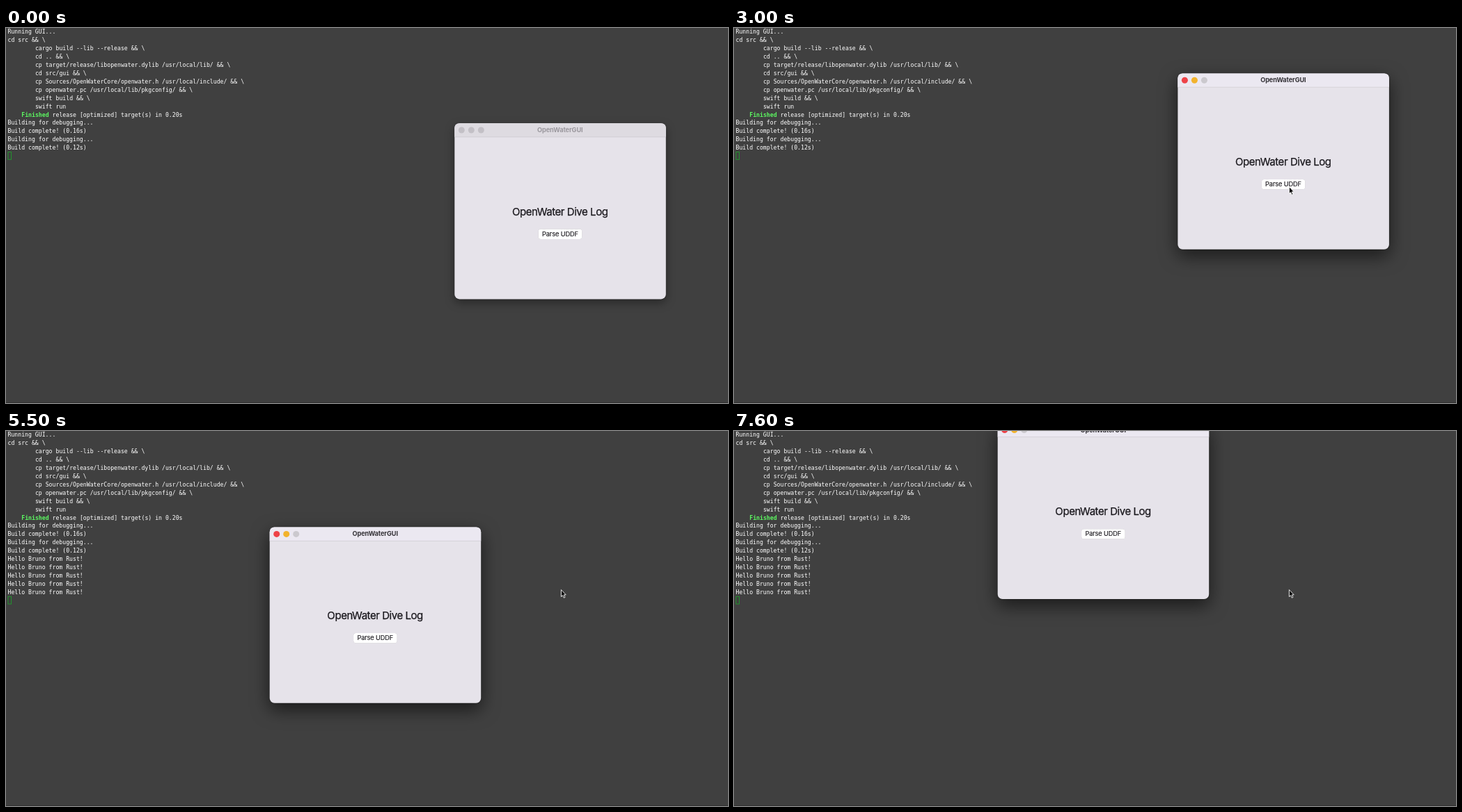
Write an HTML page that moves like this. It is 1037x540 px and loops after 8000 ms.

```html
<!DOCTYPE html>
<html lang="en">
<head>
<meta charset="utf-8">
<title>OpenWaterGUI</title>
<style>
  html, body { margin: 0; width: 100%; height: 100%; overflow: hidden; background: #404040; }
  svg { display: block; width: 1037px; height: 540px; }
  #terminal text { font: 8.19px "DejaVu Sans Mono", monospace; fill: #fff; }
  #terminal .done { font-weight: bold; fill: #5cf761; }
  #caret { fill: none; stroke: #1f9c2c; stroke-width: .9; }
  #window text { font-family: Inter, sans-serif; text-anchor: middle; fill: #1a181d; }
  #window .title { font-size: 9.2px; font-weight: 700; letter-spacing: -.1px; fill: #343237; }
  #window .heading { font-size: 15px; letter-spacing: -.45px; stroke: #1a181d; stroke-width: .25; }
  #window .label { font-size: 9.2px; letter-spacing: -.1px; stroke: #1a181d; stroke-width: .15; }
  .frame { fill: #e6e3ea; filter: drop-shadow(0 9px 13px rgba(0,0,0,.5)) drop-shadow(0 0 1px rgba(0,0,0,.3)); }
  .bar { fill: #ebe8f1; }
  .rule { fill: #d2cfd6; }
  .close { fill: #ee4248; }
  .minimize { fill: #f2b32d; }
  .zoom { fill: #cbc9ce; }
  .button { fill: #fff; filter: drop-shadow(0 .5px .6px rgba(0,0,0,.3)); }
  .pressed .button { fill: #efedf1; }
  .inactive .frame { filter: drop-shadow(0 5px 7px rgba(0,0,0,.32)) drop-shadow(0 0 1px rgba(0,0,0,.25)); }
  .inactive .bar { fill: #dedbe1; }
  .inactive .rule { fill: #cbc8ce; }
  .inactive circle { fill: #c3c0c6; }
  #window.inactive .title { fill: #9b989e; }
  #pointer { fill: #000; stroke: #fff; stroke-width: .9; stroke-linejoin: round; }
</style>
</head>
<body>
<svg viewBox="0 0 1037 540">
  <rect width="1037" height="540" fill="#404040"/>
  <rect y="539" width="1037" height="1" fill="#303030"/>
  <g id="terminal"></g>
  <rect id="caret" x="3" width="4.5" height="10.8"/>
  <g id="window">
    <rect class="frame" width="303.5" height="253.2" rx="7"/>
    <path class="bar" d="M0 19.5V7Q0 0 7 0H296.5Q303.5 0 303.5 7V19.5Z"/>
    <rect class="rule" y="19.3" width="303.5" height=".8"/>
    <circle class="close" cx="10" cy="9.8" r="4.5"/>
    <circle class="minimize" cx="24" cy="9.8" r="4.5"/>
    <circle class="zoom" cx="38" cy="9.8" r="4.5"/>
    <text class="title" x="151.5" y="12.9">OpenWaterGUI</text>
    <text class="heading" x="151.4" y="132.4">OpenWater Dive Log</text>
    <rect class="button" x="120.4" y="152.4" width="62.6" height="14.4" rx="3.6"/>
    <text class="label" x="151.6" y="162.7">Parse UDDF</text>
  </g>
  <path id="pointer" transform="translate(797.4 228.6)"
        d="M0 0V10L2.2 8L3.8 11.6L5.5 10.9L3.9 7.3H6.8Z"/>
</svg>
<script>
const LOOP = 8000, LINE = 11.95, CHAR = 4.93, LEFT = 2.5, BASELINE = 8;
const byId = id => document.getElementById(id);
const terminal = byId('terminal'), caret = byId('caret');
const appWindow = byId('window'), pointer = byId('pointer');

const output = [
  [0, 'Running GUI...'],
  [0, 'cd src && \\'],
  [8, 'cargo build --lib --release && \\'],
  [8, 'cd .. && \\'],
  [8, 'cp target/release/libopenwater.dylib /usr/local/lib/ && \\'],
  [8, 'cd src/gui && \\'],
  [8, 'cp Sources/OpenWaterCore/openwater.h /usr/local/include/ && \\'],
  [8, 'cp openwater.pc /usr/local/lib/pkgconfig/ && \\'],
  [8, 'swift build && \\'],
  [8, 'swift run'],
  [13, 'release [optimized] target(s) in 0.20s'],
  [0, 'Building for debugging...'],
  [0, 'Build complete! (0.16s)'],
  [0, 'Building for debugging...'],
  [0, 'Build complete! (0.12s)']
];

function addLine(row, indent, words, className = '') {
  const text = document.createElementNS('http://www.w3.org/2000/svg', 'text');
  text.setAttribute('x', LEFT + indent * CHAR);
  text.setAttribute('y', BASELINE + row * LINE);
  text.setAttribute('class', className);
  text.textContent = words;
  terminal.append(text);
  return text;
}

output.forEach(([indent, words], row) => addLine(row, indent, words));
addLine(10, 4, 'Finished', 'done');

// Each click holds the button for 100 ms, then prints a greeting.
const clicks = [3100, 3500, 4200, 4400, 4600];
const HOLD = 100;
const greetings = clicks.map((_, i) => addLine(output.length + i, 0, 'Hello Bruno from Rust!'));

// Window positions: [time, x, y]
const places = [
  [0, 644.3, 137.2],
  [1800, 642.2, 121],
  [1900, 638.6, 88],
  [2000, 637.4, 69],
  [2100, 637.4, 66.2],
  [2300, 637.4, 65.5],
  [5500, 378.7, 138.6],
  [6100, 644.3, 138.6],
  [6800, 378.7, 289.2],
  [7600, 378.7, -11.2]
];
const ACTIVATE = 1700, POINTER_SHOWN = 3000;

function draw(t) {
  const [, x, y] = places.findLast(([start]) => t >= start);
  appWindow.setAttribute('transform', `translate(${x} ${y})`);
  appWindow.classList.toggle('inactive', t < ACTIVATE);
  appWindow.classList.toggle('pressed', clicks.some(c => t >= c && t < c + HOLD));
  pointer.style.visibility = t >= POINTER_SHOWN ? 'visible' : 'hidden';

  const printed = clicks.filter(c => t >= c + HOLD).length;
  greetings.forEach((line, i) => { line.style.visibility = i < printed ? 'visible' : 'hidden'; });
  caret.setAttribute('y', (output.length + printed) * LINE - .7);
}

const begin = performance.now();
function tick() {
  draw((performance.now() - begin) % LOOP);
  requestAnimationFrame(tick);
}
tick();
</script>
</body>
</html>
```
